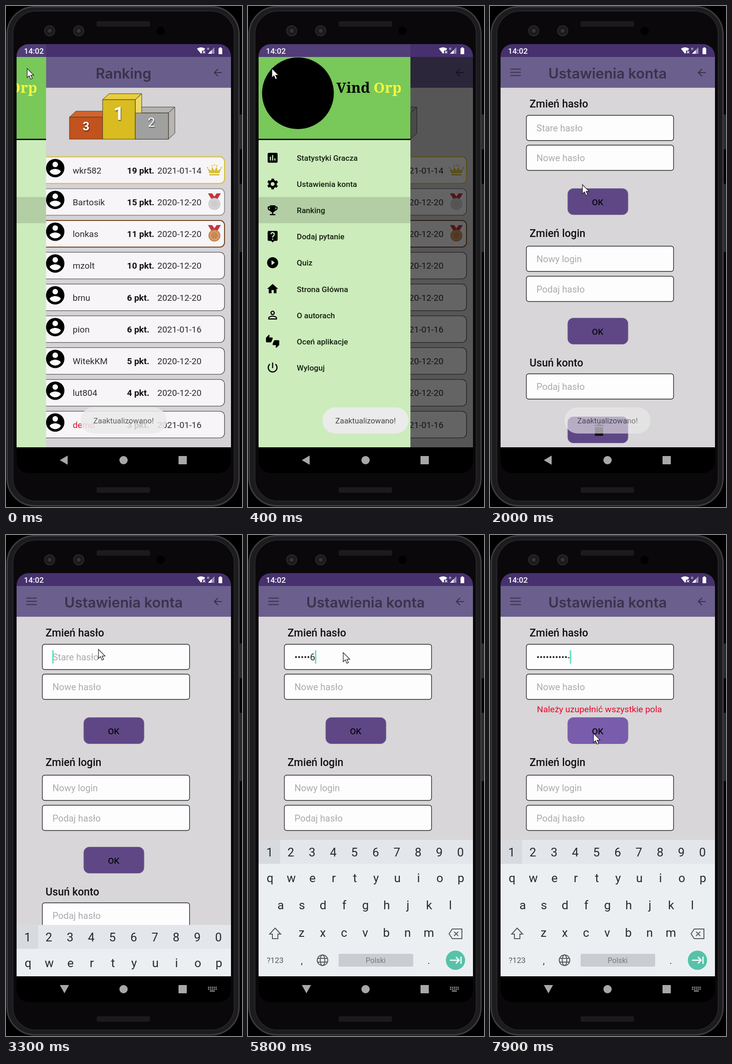
Recreate the animation shown at these times as an HTML page. Size 513 by 1091 pixels, loop 8000 ms.

```html
<!DOCTYPE html>
<html lang="pl">
<head>
<meta charset="utf-8">
<title>Ustawienia konta</title>
<style>
html, body { margin: 0; width: 100%; height: 100%; overflow: hidden; background: #000; }
svg { display: block; width: 513px; height: 1091px; font-family: Roboto, "Noto Sans", sans-serif; }
.title { font: 600 31px Inter, Lato, sans-serif; fill: #39334c; text-anchor: middle; }
.line { fill: none; stroke: #38324a; stroke-width: 2.2; }
.row { font-size: 19px; fill: #2b2b2d; }
.pts { font-weight: 700; fill: #111; }
.head { font-size: 23px; font-weight: 500; fill: #111; }
.hint { font-size: 20px; fill: #aaabac; }
.ok { font-size: 19px; font-weight: 500; fill: #0d0a12; text-anchor: middle; }
.item { font-size: 17px; font-weight: 500; fill: #14200f; }
.brand { font: 700 31px "Noto Serif", serif; }
.key { font-size: 26px; fill: #262a2c; text-anchor: middle; }
.small { font-size: 17px; fill: #55595c; text-anchor: middle; }
.num { font-weight: 700; fill: #fff; text-anchor: middle; filter: drop-shadow(1px 2px 1px #0008); }
.keyline { fill: none; stroke: #55595c; stroke-width: 2; }
</style>
</head>
<body>
<svg viewBox="0 0 513 1091" xmlns="http://www.w3.org/2000/svg">
  <defs>
    <clipPath id="screen"><rect x="23" y="83" width="466" height="934" rx="26"/></clipPath>
    <clipPath id="app"><rect x="23" y="83" width="466" height="878"/></clipPath>
    <clipPath id="rippleRow"><rect x="0" y="359" width="355" height="57"/></clipPath>
  </defs>
  <rect width="513" height="1091" fill="#000"/>
  <g fill="#2a2a2c"><rect x="507" y="236" width="6" height="76" rx="2"/><rect x="507" y="387" width="6" height="149" rx="2"/></g>
  <rect x="2.500" y="1.500" width="504" height="1087" rx="60" fill="#1c1b1e" stroke="#3c3b3e" stroke-width="3"/>
  <rect x="15" y="11" width="481" height="1067" rx="50" fill="#0a080b" stroke="#262528" stroke-width="2"/>
  <g fill="#1b1a1c"><rect x="197" y="33" width="116" height="12" rx="3"/><rect x="197" y="1048" width="116" height="12" rx="3"/></g>
  <g fill="#1b1a1c" stroke="#2a292b" stroke-width="2"><circle cx="95" cy="54" r="11"/><circle cx="158" cy="54" r="11"/></g>
  <g fill="#353437"><circle cx="95" cy="54" r="4"/><circle cx="158" cy="54" r="4"/></g>
  <circle cx="336" cy="54" r="9" fill="#000"/>

  <g clip-path="url(#screen)">
    <rect x="23" y="83" width="466" height="934" fill="#000"/>
    <g clip-path="url(#app)">
      <rect x="23" y="111" width="466" height="850" fill="#d8d6d8"/>
      <rect x="23" y="111" width="466" height="67" fill="#6b5f8d"/>
      <path class="line" d="M44 137.500h23M44 144.500h23M44 151.500h23M469 145h-16M461 137l-8 8 8 8"/>
      <g id="ranking"></g>
      <g id="settings"></g>
      <g id="keyboard"></g>
      <rect id="scrim" x="23" y="111" width="466" height="850"/>
      <rect x="23" y="83" width="466" height="28" fill="#46316e"/>
      <g id="drawer"></g>
      <text x="39" y="104" font-size="17" font-weight="500" fill="#fff">14:02</text>
      <g fill="#fff">
        <path d="M415 93q9-6 18 0l-3 4h-4v5l-2 2z"/><path d="M428 98l5 5m0-5l-5 5" stroke="#fff" stroke-width="1.500"/>
        <text x="437" y="96" font-size="8">R</text>
        <path d="M439 104l14-14v14z" opacity=".45"/><path d="M439 104l8-8v8z"/>
        <path d="M462 92h2v-2h4v2h2v13h-8z"/>
      </g>
      <g id="toast">
        <rect x="162" y="874" width="187" height="57" rx="28" fill="#ebebeb"/>
        <text x="255.500" y="909" font-size="16.800" text-anchor="middle" fill="#444">Zaaktualizowano!</text>
      </g>
    </g>
    <g fill="#a8a8a8">
      <path id="navBack" d="M117 989l17-10v20z"/>
      <circle cx="255.500" cy="989" r="9"/><rect x="375" y="980" width="18" height="18" rx="1"/>
      <g id="navKeys">
        <path d="M117 980h20l-10 18z"/>
        <path d="M439 985h19M439 989h19" stroke="#a8a8a8" stroke-width="2.500" stroke-dasharray="2.500 1.600"/>
        <path d="M443 993h11" stroke="#a8a8a8" stroke-width="2"/>
      </g>
    </g>
  </g>
  <path id="cursor" d="M0 0v20l4.500-4.200 3.300 7.700 3.400-1.500-3.300-7.400h6.300z" fill="#fff" stroke="#222" stroke-width="1.300"/>
</svg>
<script>
const $ = id => document.getElementById(id);
const LOOP = 8000;
const rect = (x, y, w, h, attrs) => `<rect x="${x}" y="${y}" width="${w}" height="${h}" ${attrs}/>`;
const text = (x, y, cls, s, attrs = '') => `<text x="${x}" y="${y}" class="${cls}" ${attrs}>${s}</text>`;
const icon = (x, y, scale, body) => `<g transform="translate(${x} ${y}) scale(${scale}) translate(-12 -12)">${body}</g>`;
const path = (d, attrs = '') => `<path d="${d}" ${attrs}/>`;

// Ranking page
const disc = 'M12 2C6.480 2 2 6.480 2 12s4.480 10 10 10 10-4.480 10-10S17.520 2 12 2z';
const avatar = `<circle cx="12" cy="12" r="10"/><circle cx="12" cy="8" r="3" fill="#fff"/>` +
  path('M6 15.980c.03-1.990 4-3.080 6-3.080 1.990 0 5.970 1.090 6 3.080a7.200 7.200 0 0 1-12 0z', 'fill="#fff"');
const players = [
  ['wkr582', 19, '2021-01-14', '#dcc22f'], ['Bartosik', 15, '2020-12-20', '#98989a'], ['lonkas', 11, '2020-12-20', '#74451c'],
  ['mzolt', 10, '2020-12-20'], ['brnu', 6, '2020-12-20'], ['pion', 6, '2021-01-16'],
  ['WitekKM', 5, '2020-12-20'], ['lut804', 4, '2020-12-20'], ['demo', 3, '2021-01-16']
];
const medal = (y, color) =>
  path(`M439 ${y - 23}h9l5 7 5-7h9l-9 15h-10z`, 'fill="#c9363c"') +
  `<circle cx="453" cy="${y}" r="13" fill="${color}"/><circle cx="453" cy="${y}" r="9" fill="none" stroke="#fff5" stroke-width="1.500"/>`;
const crown = path('M442 364l-4-11 8 6 2-9 5 9 5-9 2 9 8-6-4 11z', 'fill="#d9c13c"') +
  rect(442, 366, 22, 3, 'fill="#d9c13c"') +
  [[438, 352], [448, 348], [453, 346], [458, 348], [468, 352]].map(([x, y]) => `<circle cx="${x}" cy="${y}" r="1.500" fill="#d9c13c"/>`).join('');

// A box from y down to the podium's base, with its top and right side
const block = (x, y, w, front, top, side) =>
  path(`M${x} ${y}l14-13h${w}l-14 13z`, `fill="${top}"`) +
  path(`M${x + w} ${y}l14-13v${290 - y}l-14 13z`, `fill="${side}"`) + rect(x, y, w, 290 - y, `fill="${front}"`);

$('ranking').innerHTML = text(255.5, 158, 'title', 'Ranking') +
  `<g stroke="#4a3a22">${block(138, 242, 72, '#c5531e', '#d5662e', '#a8431a')}${block(281, 233, 72, '#a3a3a3', '#b5b5b5', '#b9b9bb')}${block(210, 204, 71, '#dcbf20', '#ecd040', '#f0dc6a')}${rect(281, 233, 72, 57, 'fill="#a3a3a3"')}</g>` +
  text(174, 271, 'num', 3, 'font-size="26"') + text(245, 248, 'num', 1, 'font-size="40"') +
  text(316, 263, 'num', 2, 'font-size="28" style="font-weight:400"') +
  players.map(([name, score, date, color], i) => {
    const y = 357 + i * 69.25;
    return rect(40, y - 28.5, 435, 58, `rx="10" fill="#fbf9fc" stroke="${color || '#333'}" stroke-width="${color ? 2 : 1.2}"`) +
      icon(107, y - 4, 2, avatar) + text(145, y + 7.6, 'row', name, i === 8 ? 'style="fill:#e0142c"' : '') +
      text(263, y + 7.6, 'row pts', score + ' pkt.') + text(329, y + 7.6, 'row', date);
  }).join('') + crown + medal(431, '#d0d0d0') + medal(500, '#cd8a50');

// Settings page
const field = (y, hint, attrs = '') =>
  rect(79, y, 320, 55, 'rx="5" fill="#fefdfe" stroke="#252527" stroke-width="1.400"') + text(101, y + 35, 'hint', hint, attrs);
const button = (y, label, attrs = '') =>
  rect(169, y, 131, 57, `rx="12" fill="#5f4786" stroke="#766d94" ${attrs}`) + text(234, y + 36, 'ok', label);
$('settings').innerHTML = text(255.5, 158, 'title', 'Ustawienia konta') +
  text(86, 221, 'head', 'Zmień hasło') + field(238, 'Stare hasło', 'id="oldHint"') + field(303, 'Nowe hasło') +
  text(238, 386, 'row', 'Należy uzupełnić wszystkie pola', 'id="error" text-anchor="middle" style="fill:#e6062c"') +
  button(397.5, 'OK', 'id="press"') +
  text(86, 503, 'head', 'Zmień login') + field(523, 'Nowy login') + field(588.5, 'Podaj hasło') + button(679.5, 'OK') +
  text(86, 785, 'head', 'Usuń konto') + field(801, 'Podaj hasło') + button(894.5, '') +
  path('M228 917h18v19h-18zM227 912h6l1-2h6l1 2h6v3h-20z', 'fill="#120e18"') +
  text(101, 273, 'hint', '', 'id="typed" style="fill:#28282a"') + rect(0, 251, 3, 29, 'id="caret" fill="#5fdfc0"');

// Drawer, laid out in its open position
const menu = [
  ['Statystyki Gracza', path('M19 3H5c-1.100 0-2 .9-2 2v14c0 1.100.9 2 2 2h14c1.100 0 2-.9 2-2V5c0-1.100-.9-2-2-2zM9 17H7v-7h2v7zm4 0h-2V7h2v10zm4 0h-2v-4h2v4z')],
  ['Ustawienia konta', '<g fill="none" stroke="#000" transform="rotate(30 12 12)"><circle cx="12" cy="12" r="5.600" stroke-width="4.200"/><circle cx="12" cy="12" r="8" stroke-width="3.800" stroke-dasharray="4.200 4.178" stroke-dashoffset="2.100"/></g>'],
  ['Ranking', path('M19 5h-2V3H7v2H5c-1.100 0-2 .9-2 2v1c0 2.550 1.920 4.630 4.390 4.940.63 1.500 1.980 2.630 3.610 2.960V19H7v2h10v-2h-4v-3.100c1.630-.33 2.980-1.460 3.610-2.960C19.080 12.630 21 10.550 21 8V7c0-1.100-.9-2-2-2zM5 8V7h2v3.820C5.840 10.400 5 9.300 5 8zm14 0c0 1.300-.84 2.400-2 2.820V7h2v1z')],
  ['Dodaj pytanie', path('M5 2h14a2 2 0 0 1 2 2v14a2 2 0 0 1-2 2h-4l-3 3-3-3H5a2 2 0 0 1-2-2V4a2 2 0 0 1 2-2z') + path('M9 8a3 3 0 1 1 5.200 2c-1.200 1.200-2.200 1.800-2.200 4M12 16v2', 'fill="none" stroke="#cdecbc" stroke-width="2"')],
  ['Quiz', path(disc + 'M10 16.500v-9l6 4.500z', 'fill-rule="evenodd"')],
  ['Strona Główna', path('M10 20v-6h4v6h5v-8h3L12 3 2 12h3v8z')],
  ['O autorach', '<g fill="none" stroke="#000" stroke-width="1.900"><circle cx="12" cy="8" r="3"/><path d="M5 19v-2c0-1.700 4-3.050 7-3.050s7 1.350 7 3.050v2z"/></g>'],
  ['Oceń aplikacje', ['', ' rotate(180 12 12)'].map(r => `<g transform="${r}">${path('M12 6a1 1 0 0 0-1-1H5.820l.68-3.400-.33-.8L5.380 0 .44 4.940A1.500 1.500 0 0 0 0 6v6.500A1.500 1.500 0 0 0 1.500 14h6.750a1.500 1.500 0 0 0 1.380-.91l2.260-5.290z')}</g>`).join('')],
  ['Wyloguj', '<path d="M12 3v10M7 5.800a8 8 0 1 0 10 0" fill="none" stroke="#000" stroke-width="2"/>']
];
$('drawer').innerHTML = rect(0, 83, 355, 28, 'fill="#fff" opacity=".06"') +
  rect(0, 111, 355, 850, 'fill="#cdecbc"') + rect(0, 111, 355, 178, 'fill="#79c85a"') + rect(0, 289, 355, 3, 'fill="#0c140a"') +
  '<circle cx="110.500" cy="190" r="78"/>' +
  text(194, 189, 'brand', 'Vind') + text(275, 189, 'brand', 'Orp', 'fill="#f7f73c"') +
  rect(0, 416, 355, 57, 'fill="#000" opacity=".13"') +
  '<circle id="ripple" cx="198.500" cy="388" clip-path="url(#rippleRow)"/>' +
  menu.map(([label, art], i) => icon(55.5, 330.5 + i * 57.1, 1.2, art) + text(108, 337 + i * 57.1, 'item', label)).join('');

// Keyboard
const keys = (chars, x, y) => [...chars].map((c, i) => text(x + i * 46.1, y, 'key', c)).join('');
$('keyboard').innerHTML = rect(23, 664, 466, 297, 'fill="#eceff2"') + rect(23, 664, 466, 52, 'fill="#e3e6ea"') +
  rect(23, 664, 47, 52, 'fill="#d7dade"') +
  keys('1234567890', 47, 700) + keys('qwertyuiop', 48, 756) + keys('asdfghjkl', 71, 815) + keys('zxcvbnm', 116.5, 875) +
  path('M59 856l12 13h-6v10h-12v-10h-6zM444 858h21v21h-21l-7-10.500zM448 864l9 9m0-9l-9 9', 'class="keyline"') +
  text(59, 932, 'small', '?123') + text(117, 934, 'key', ',', 'style="font-size:20px"') + text(393, 934, 'key', '.', 'style="font-size:20px"') +
  '<g class="keyline"><circle cx="162" cy="926" r="11.500"/><ellipse cx="162" cy="926" rx="5" ry="11.500"/><path d="M152 922h20M152 930h20"/></g>' +
  rect(197, 912, 162, 28, 'rx="3" fill="#c9ccd0"') + text(277.5, 932, 'small', 'Polski', 'style="font-size:16px;fill:#777b7f"') +
  '<circle cx="451" cy="926" r="21" fill="#57c2a9"/><path d="M439 926h19M452 919l7 7-7 7M463 918v16" fill="none" stroke="#fff" stroke-width="2.500"/>';

// Motion
const clamp = v => Math.max(0, Math.min(1, v));
const span = (t, from, to) => clamp((t - from) / (to - from));
const settle = p => 1 - (1 - p) ** 5;
const smooth = p => p * p * (3 - 2 * p);
const mouse = [[0, 46, 136], [400, 52, 136], [1200, 201, 389], [2300, 201, 389], [3000, 201, 249],
  [4150, 201, 249], [4500, 207, 256], [6700, 207, 256], [7500, 225, 432], [LOOP, 225, 432]];
const FOCUS = 3200;
const strokes = [4700, 4900, 5000, 5100, 5300, 5600, 5900, 6000, 6100, 6400, 6700];
const secret = '1234567890-';
const show = (id, on) => $(id).style.display = on ? '' : 'none';

function render(t) {
  const onSettings = t >= 1600;
  const open = onSettings ? 1 - settle(span(t, 1600, 1960)) : settle(span(t, -27, 640));
  show('ranking', !onSettings);
  show('settings', onSettings);
  show('drawer', open > 0);
  $('drawer').setAttribute('transform', `translate(${332 * (open - 1)})`);
  // the shade sets in once the drawer has clearly moved
  $('scrim').setAttribute('opacity', .6 * span(open, .17, 1));

  $('ripple').setAttribute('r', t < 1400 ? 0 : 60 + (t - 1400) * .46);
  $('ripple').setAttribute('opacity', .07 * (1 - span(t, 1600, 1800)));
  $('toast').setAttribute('opacity', Math.min(.85 + t / 1000, 1) * (1 - span(t, 1880, 2200)));

  const up = 1 - (1 - span(t, 3250, 3600)) ** 3;
  show('keyboard', up > 0);
  $('keyboard').setAttribute('transform', `translate(0 ${297 * (1 - up)})`);
  show('navKeys', t >= 3300);
  show('navBack', t < 3300);

  const count = strokes.filter(s => s <= t).length;
  $('typed').textContent = count ? '•'.repeat(count - 1) + secret[count - 1] : '';
  show('oldHint', !count);
  const since = t - (count ? strokes[count - 1] : FOCUS);
  show('caret', since >= 0 && since % 1000 < 500);
  $('caret').setAttribute('x', 100.5 + (count ? $('typed').getComputedTextLength() : 0));

  const p = span(t, 7550, 7800);
  $('press').setAttribute('fill', `rgb(${95 + 27 * p},${71 + 21 * p},${134 + 38 * p})`);
  show('error', t >= 7700);

  const i = mouse.findIndex(m => m[0] > t);
  const [t0, x0, y0] = mouse[i - 1], [t1, x1, y1] = mouse[i];
  const k = smooth(span(t, t0, t1));
  $('cursor').setAttribute('transform', `translate(${x0 + (x1 - x0) * k} ${y0 + (y1 - y0) * k})`);
}

const start = performance.now();
function tick() {
  render((performance.now() - start) % LOOP);
  requestAnimationFrame(tick);
}
tick();
</script>
</body>
</html>
```
